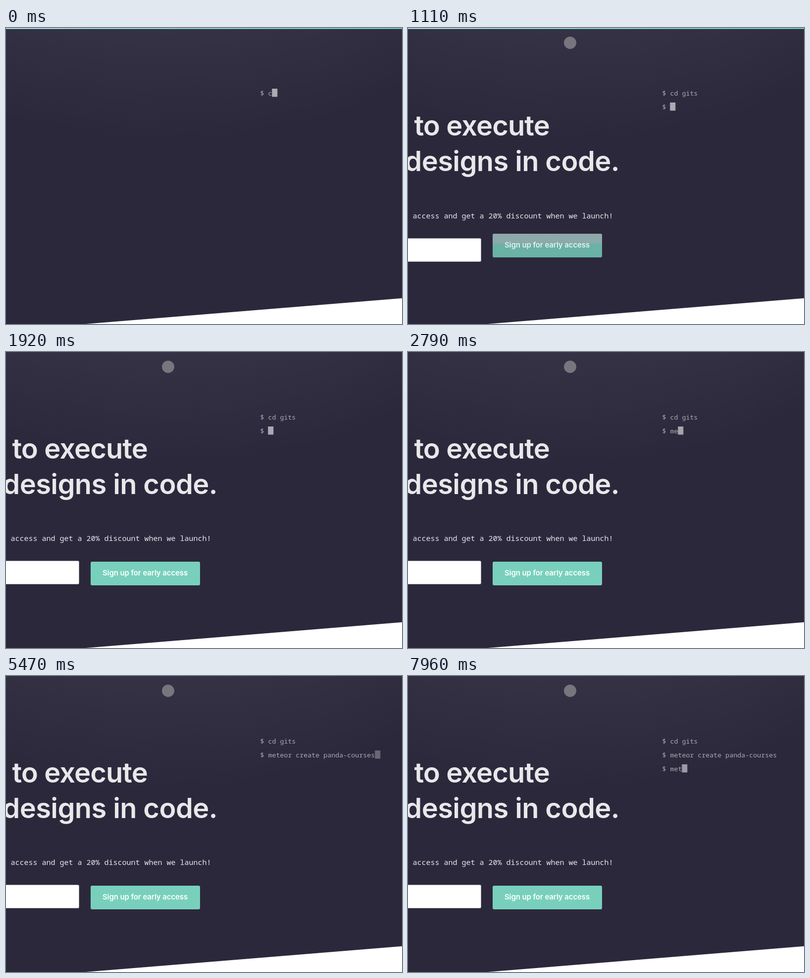
An HTML page with a canvas for the animation above (8 s loop, 800 by 600 pixels).

```html
<!DOCTYPE html>
<html lang="en">
<head>
<meta charset="utf-8">
<title>Landing page</title>
<style>
  html, body { margin: 0; width: 100%; height: 100%; overflow: hidden; background: #2c283c; }
  canvas { display: block; }
</style>
</head>
<body>
<canvas id="stage" width="800" height="600"></canvas>
<script>
const ctx = document.getElementById('stage').getContext('2d');
const LOOP = 8000;
const MONO = '"Noto Sans Mono", monospace';
const SANS = 'Inter, sans-serif';
const DIM = 'rgba(255,255,255,.6)';

// One entry per prompt: when it appears and when each key lands.
const lines = [
  { from: 0, text: 'cd gits', typed: t => 1 + (t >= 90) + Math.max(0, Math.floor((t - 120) / 110)) },
  { from: 1030, text: 'meteor create panda-courses', typed: t => Math.floor((t - 2490) / 103.3) },
  { from: 5650, text: 'met', typed: t => (t >= 7720) + (t >= 7900) + (t >= 7960) }
];

const clamp = (v, lo = 0, hi = 1) => Math.min(hi, Math.max(lo, v));
const ramp = (t, start, length) => clamp((t - start) / length);

function text(str, x, y, font, color, align = 'left', spacing = 0) {
  ctx.font = font;
  ctx.fillStyle = color;
  ctx.textAlign = align;
  ctx.letterSpacing = spacing + 'px';
  ctx.fillText(str, x, y);
}

function box(x, y, w, h, r, fill) {
  ctx.beginPath();
  ctx.roundRect(x, y, w, h, r);
  ctx.fillStyle = fill;
  ctx.fill();
}

function layer(alpha, dy, draw) {
  ctx.save();
  ctx.globalAlpha = alpha;
  ctx.translate(0, dy);
  draw();
  ctx.restore();
}

function background() {
  const glow = ctx.createRadialGradient(327, -909, 909, 327, -909, 1137);
  glow.addColorStop(0, '#353245');
  glow.addColorStop(1, '#2c283c');
  ctx.fillStyle = glow;
  ctx.fillRect(0, 0, 800, 600);

  ctx.beginPath();
  ctx.moveTo(161, 600);
  ctx.lineTo(800, 547.8);
  ctx.lineTo(800, 600);
  ctx.fillStyle = '#fff';
  ctx.fill();
}

function loadingBar() {
  const tint = ctx.createLinearGradient(0, 0, 800, 0);
  tint.addColorStop(0, '#a8e6dc');
  tint.addColorStop(1, '#70d0bc');
  ctx.fillStyle = tint;
  ctx.fillRect(0, 0, 800, 2);
}

function emblem() {
  ctx.beginPath();
  ctx.arc(327.5, 30, 12.5, 0, Math.PI * 2);
  ctx.fillStyle = '#78757f';
  ctx.fill();
}

function intro() {
  const heading = `600 56px ${SANS}`;
  text('to execute', 12.5, 215.5, heading, '#e8e8ea', 'left', -0.9);
  text('designs in code.', 427, 287.5, heading, '#e8e8ea', 'right', -0.6);
  text('early access and get a 20% discount when we launch!', -44.5, 383, `15px ${MONO}`, '#e8e8ea');
  box(-20, 423, 168, 48, 3, '#a3a1aa');
  box(-20, 424, 167, 46, 2, '#fff');
}

function button(haze) {
  box(171, 425, 221, 48, 3, '#78d0bc');
  if (haze > 0) {
    const veil = ctx.createLinearGradient(0, 425, 0, 448);
    veil.addColorStop(0, `rgba(180,160,178,${haze})`);
    veil.addColorStop(0.72, `rgba(180,160,178,${haze})`);
    veil.addColorStop(1, 'rgba(180,160,178,0)');
    box(171, 425, 221, 48, 3, veil);
  }
  text('Sign up for early access', 281, 453, `600 15px ${SANS}`, '#fff', 'center', -0.1);
}

// Full for a moment, then dips to nothing and back.
function blink(t) {
  const u = (t - 250 + 950) % 950;
  return u < 710 ? Math.abs(Math.cos(Math.PI * u / 710)) : 1;
}

function terminal(t) {
  const shown = lines.filter(line => t >= line.from);
  shown.forEach((line, i) => {
    const n = clamp(line.typed(t), 0, line.text.length);
    const y = 137 + i * 28;
    text('$ ' + line.text.slice(0, n), 513.4, y, `13.333px ${MONO}`, DIM);
    if (i === shown.length - 1) {
      layer(blink(t), 0, () => {
        ctx.fillStyle = DIM;
        ctx.fillRect(529.3 + n * 8, y - 14, 11, 16.5);
      });
    }
  });
}

// Damped spring, in px below the resting place.
function spring(t) {
  const s = Math.max(0, t - 740) / 1000;
  return 96 * Math.exp(-5.9 * s) * Math.cos(10.5 * s);
}

function draw(t) {
  // Whole pixels once at rest keep the edges sharp.
  const drop = t < 1800 ? spring(t) : 0;
  background();
  layer(1 - ramp(t, 1200, 500), 0, loadingBar);
  layer(ramp(t, 80, 600), 0, emblem);
  layer(ramp(t, 230, 750), 98 * (1 - ramp(t, 230, 1280)) ** 3, intro);
  layer(ramp(t, 740, 450), drop, () => button(0.6 * (1 - ramp(t, 1100, 300))));
  terminal(t);
}

let start;
function tick(now) {
  start ??= now;
  draw((now - start) % LOOP);
  requestAnimationFrame(tick);
}
requestAnimationFrame(tick);
</script>
</body>
</html>
```
